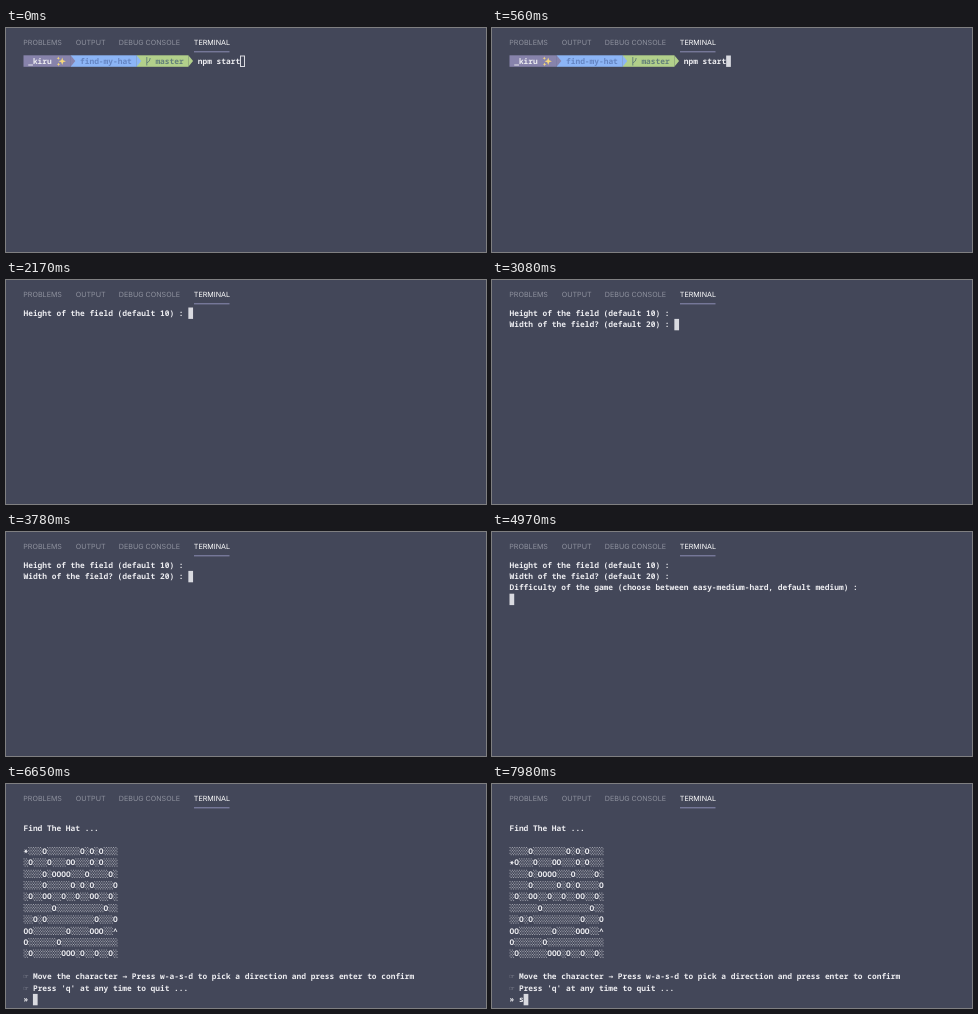
These frames come from a looping animation (480x224 px, 8000 ms). An HTML page with a canvas:

```html
<!DOCTYPE html>
<html lang="en">
<head>
<meta charset="utf-8">
<title>Terminal game</title>
<style>
  html, body { margin: 0; width: 100%; height: 100%; overflow: hidden; background: #434759; }
  canvas { display: block; width: 480px; height: 224px; }
</style>
</head>
<body>
<canvas id="stage"></canvas>
<script>
const W = 480, H = 224, LOOP = 8000;
const LEFT = 17.5, CELL = 4.71, TOP = 27.4, LINE = 11.4;
const MONO = '700 7.85px "Noto Sans Mono", "DejaVu Sans Mono", monospace';
const SYMBOL = '700 7.85px "DejaVu Sans Mono", monospace';
const BG = '#434759', FG = '#ececf0', CURSOR = '#d9dae0';

const canvas = document.getElementById('stage');
const ctx = canvas.getContext('2d');
const dpr = window.devicePixelRatio || 1;
canvas.width = W * dpr;
canvas.height = H * dpr;
ctx.scale(dpr, dpr);
ctx.textRendering = 'geometricPrecision';

const colX = col => LEFT + col * CELL;
const rowY = row => TOP + row * LINE;

function rect(x, y, w, h, color) {
  ctx.fillStyle = color;
  ctx.fillRect(x, y, w, h);
}

function print(text, row, col = 0, color = FG, font = MONO) {
  ctx.font = font;
  ctx.fillStyle = color;
  ctx.fillText(text, colX(col), rowY(row) + 8.2);
}

function poly(points, color) {
  ctx.fillStyle = color;
  ctx.beginPath();
  points.forEach(([x, y]) => ctx.lineTo(x, y));
  ctx.fill();
}

function cursor(row, col, hollow = false) {
  if (hollow) {
    ctx.strokeStyle = CURSOR;
    ctx.lineWidth = 1;
    ctx.strokeRect(234.5, 28, 4, 10.5);
  } else {
    rect(colX(col), rowY(row) + 0.1, CELL, 11.4, CURSOR);
  }
}

function drawTabs() {
  const tabs = [['PROBLEMS', 17.3], ['OUTPUT', 69.7], ['DEBUG CONSOLE', 112.8], ['TERMINAL', 187.8]];
  ctx.font = '400 7.15px Inter, Roboto, sans-serif';
  tabs.forEach(([name, x], i) => {
    ctx.fillStyle = i === 3 ? '#ffffff' : '#8d909d';
    ctx.fillText(name, x, 17.2);
  });
  rect(188, 23.3, 35.5, 1, '#8a8cb4');
}

// One coloured block of the shell prompt with its arrow tip
function segment(from, to, color) {
  const x = colX(from), tip = colX(to), y = 27.3, h = 11.5;
  rect(x, y, tip - x, h, color);
  poly([[tip, y], [tip + CELL, y + h / 2], [tip, y + h]], color);
}

function star(x, y, r, color = '#f6d77a', tips = 4) {
  const points = [];
  for (let i = 0; i < tips * 2; i++) {
    const a = i * Math.PI / tips, d = i % 2 ? r * 0.36 : r;
    points.push([x + d * Math.cos(a), y + d * Math.sin(a)]);
  }
  poly(points, color);
}

function branch(x, y, color) {
  ctx.strokeStyle = color;
  ctx.lineWidth = 0.9;
  ctx.beginPath();
  ctx.moveTo(x, y - 4);
  ctx.lineTo(x, y + 4.5);
  ctx.moveTo(x, y + 2);
  ctx.quadraticCurveTo(x + 3.4, y + 0.5, x + 3.4, y - 3);
  ctx.stroke();
}

function drawPrompt() {
  segment(24, 35, '#b2d08b');
  segment(10, 24, '#8cb5f6');
  segment(0, 10, '#8783ab');
  print('_kiru', 0, 1);
  star(56.2, 33.2, 3.7);
  star(52.3, 30.2, 1.7);
  star(52.6, 36.3, 1.9);
  print('find-my-hat', 0, 12, '#6585c2');
  branch(140.8, 33, '#607c78');
  print('master', 0, 28, '#64807a');
  print('npm start', 0, 37);
}

function drawStartup() {
  drawPrompt();
  print('> find-my-hat@1.0.0 start /Users/dev/Documents/code/javascript/find-my-hat', 2);
  print('> node main.js', 3);
  cursor(5, 0);
}

const QUESTIONS = [
  'Height of the field (default 10) :',
  'Width of the field? (default 20) :',
  'Difficulty of the game (choose between easy-medium-hard, default medium) :'
];

function drawQuestions(count, answered) {
  QUESTIONS.slice(0, count).forEach((text, row) => print(text, row));
  if (answered) cursor(count, 0);
  else cursor(count - 1, QUESTIONS[count - 1].length + 1);
}

const FIELD = [
  '....O.......O.O.O...',
  '.O...O...OO...O.O...',
  '....O.OOOO...O....O.',
  '....O.....O.O.O....O',
  '.O..OO..O..O..OO..O.',
  '......O..........O..',
  '..O.O..........O...O',
  'OO.......O....OOO..^',
  'O......O............',
  '.O......OOO.O..O..O.'
];

// Light shade: staggered dots
function shade(x, y) {
  ctx.fillStyle = 'rgba(241,241,244,0.58)';
  for (let j = 0; j < 6; j++) {
    for (let i = 0; i < 2; i++) {
      ctx.fillRect(x + i * CELL / 2 + (j % 2) * CELL / 4, y + j * 1.45, 1.05, 0.95);
    }
  }
}

function drawField(playerRow) {
  FIELD.forEach((line, r) => {
    [...line].forEach((tile, c) => {
      const row = r + 3;
      if (c === 0 && r === playerRow) star(colX(0.5), rowY(row) + 5.7, 2.6, FG, 6);
      else if (tile === '.') shade(colX(c), rowY(row) + 1.4);
      else print(tile, row, c);
    });
  });
}

function drawGame(playerRow, typed) {
  print('Find The Hat ...', 1);
  drawField(playerRow);
  print('☞', 14, 0, '#b5b7c1');
  print('Move the character', 14, 2);
  print('→', 14, 21, FG, SYMBOL);
  print('Press w-a-s-d to pick a direction and press enter to confirm', 14, 23);
  print('☞', 15, 0, '#b5b7c1');
  print("Press 'q' at any time to quit ...", 15, 2);
  print('» ' + typed, 16);
  cursor(16, 2 + typed.length);
}

// Each scene holds from its start time until the next one
const SCENES = [
  [0, () => { drawPrompt(); cursor(0, 46, true); }],
  [490, () => { drawPrompt(); cursor(0, 46); }],
  [1820, () => { drawPrompt(); cursor(1, 0); }],
  [2100, drawStartup],
  [2170, () => drawQuestions(1)],
  [3080, () => drawQuestions(2)],
  [3850, () => drawQuestions(3)],
  [4970, () => drawQuestions(3, true)],
  [5040, () => drawGame(0, '')],
  [7210, () => drawGame(0, 's')],
  [7420, () => drawGame(1, '')],
  [7980, () => drawGame(1, 's')]
];

const start = performance.now();

function frame() {
  const t = (performance.now() - start) % LOOP;
  rect(0, 0, W, H, BG);
  drawTabs();
  SCENES.filter(([from]) => from <= t).pop()[1]();
  requestAnimationFrame(frame);
}
frame();
</script>
</body>
</html>
```
